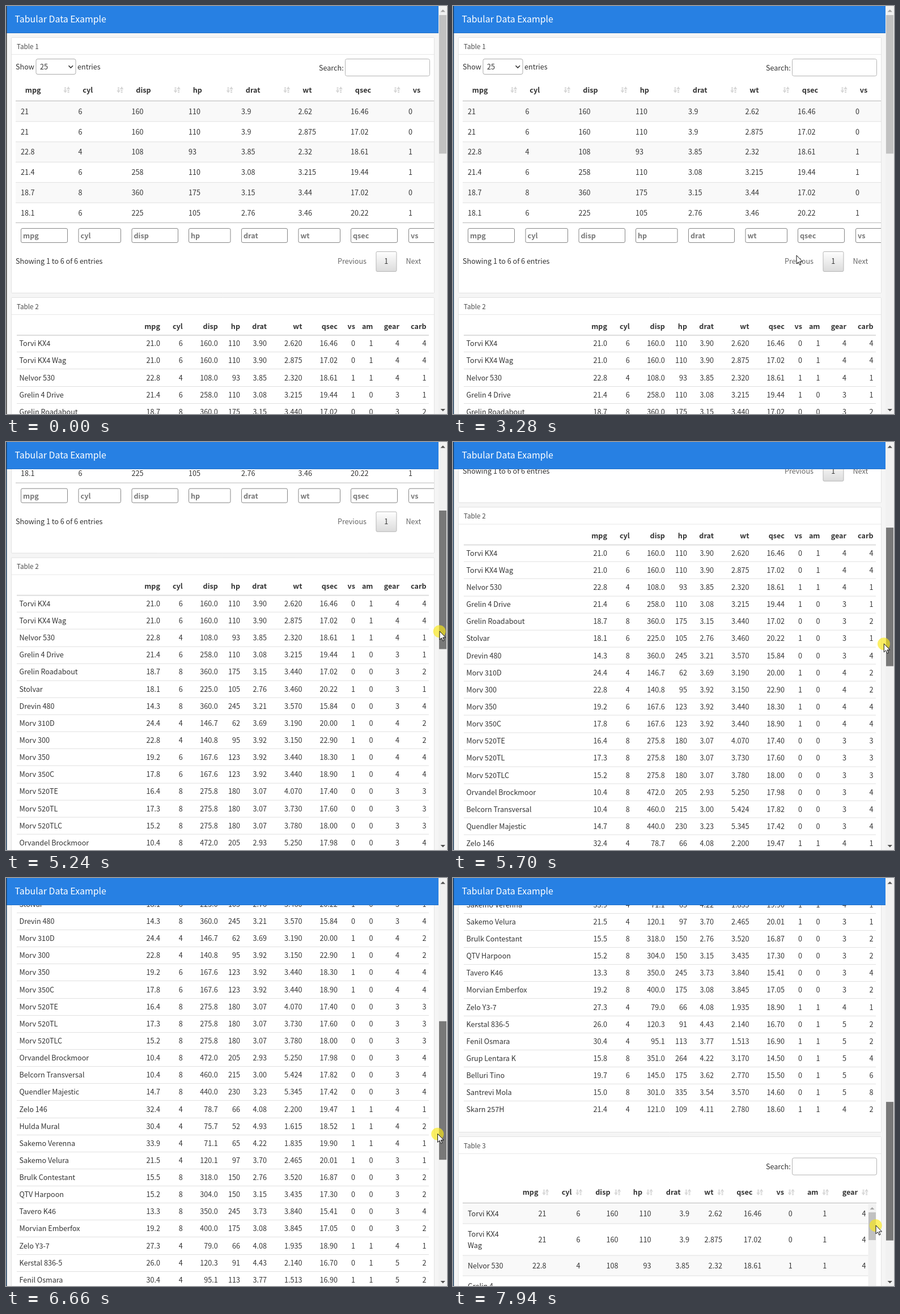
Animation, 778 px wide and 720 px high, one loop 8 s. Source, as an HTML page with a canvas:

```html
<!DOCTYPE html>
<html lang="en">
<head>
<meta charset="utf-8">
<title>Tabular Data Example</title>
<style>
html, body { margin: 0; width: 100%; height: 100%; overflow: hidden; background: #f5f5f5; }
canvas { display: block; }
</style>
</head>
<body>
<canvas id="stage" width="778" height="720"></canvas>
<script>
const ctx = document.getElementById('stage').getContext('2d');
const W = 778, H = 720, LOOP = 8000, BAR = 48;
const FACE = '"Noto Sans CJK JP", "Noto Sans CJK SC", "Noto Sans", sans-serif';
const SIZE = 12.6, INK = '#333';
const COLS = ['mpg', 'cyl', 'disp', 'hp', 'drat', 'wt', 'qsec', 'vs', 'am', 'gear', 'carb'];

// name | measurements | one digit each for vs, am, gear, carb
const CARS = `Torvi KX4|21.0 6 160.0 110 3.90 2.620 16.46|0144
Torvi KX4 Wag|21.0 6 160.0 110 3.90 2.875 17.02|0144
Nelvor 530|22.8 4 108.0 93 3.85 2.320 18.61|1141
Grelin 4 Drive|21.4 6 258.0 110 3.08 3.215 19.44|1031
Grelin Roadabout|18.7 8 360.0 175 3.15 3.440 17.02|0032
Stolvar|18.1 6 225.0 105 2.76 3.460 20.22|1031
Drevin 480|14.3 8 360.0 245 3.21 3.570 15.84|0034
Morv 310D|24.4 4 146.7 62 3.69 3.190 20.00|1042
Morv 300|22.8 4 140.8 95 3.92 3.150 22.90|1042
Morv 350|19.2 6 167.6 123 3.92 3.440 18.30|1044
Morv 350C|17.8 6 167.6 123 3.92 3.440 18.90|1044
Morv 520TE|16.4 8 275.8 180 3.07 4.070 17.40|0033
Morv 520TL|17.3 8 275.8 180 3.07 3.730 17.60|0033
Morv 520TLC|15.2 8 275.8 180 3.07 3.780 18.00|0033
Orvandel Brockmoor|10.4 8 472.0 205 2.93 5.250 17.98|0034
Belcorn Transversal|10.4 8 460.0 215 3.00 5.424 17.82|0034
Quendler Majestic|14.7 8 440.0 230 3.23 5.345 17.42|0034
Zelo 146|32.4 4 78.7 66 4.08 2.200 19.47|1141
Hulda Mural|30.4 4 75.7 52 4.93 1.615 18.52|1142
Sakemo Verenna|33.9 4 71.1 65 4.22 1.835 19.90|1141
Sakemo Velura|21.5 4 120.1 97 3.70 2.465 20.01|1031
Brulk Contestant|15.5 8 318.0 150 2.76 3.520 16.87|0032
QTV Harpoon|15.2 8 304.0 150 3.15 3.435 17.30|0032
Tavero K46|13.3 8 350.0 245 3.73 3.840 15.41|0034
Morvian Emberfox|19.2 8 400.0 175 3.08 3.845 17.05|0032
Zelo Y3-7|27.3 4 79.0 66 4.08 1.935 18.90|1141
Kerstal 836-5|26.0 4 120.3 91 4.43 2.140 16.70|0152
Fenil Osmara|30.4 4 95.1 113 3.77 1.513 16.90|1152
Grup Lentara K|15.8 8 351.0 264 4.22 3.170 14.50|0154
Belluri Tino|19.7 6 145.0 175 3.62 2.770 15.50|0156
Santrevi Mola|15.0 8 301.0 335 3.54 3.570 14.60|0158
Skarn 257H|21.4 4 121.0 109 4.11 2.780 18.60|1142`.split('\n').map(line => {
  const [name, nums, flags] = line.split('|');
  return { name, cells: [...nums.split(' '), ...flags] };
});

// The screen refreshes in bursts: [first change, last change, count]
const BURSTS = [[70, 1040, 7], [1520, 2320, 6], [2630, 3610, 7], [3770, 4250, 4],
  [4590, 5560, 7], [5700, 6660, 7], [6830, 7150, 3], [7460, 7940, 4]];
const SCROLL = [[4250, 0], [4590, 14.5], [5237, 310.5], [5560, 385], [6020, 432.5],
  [6660, 700], [7150, 853], [7940, 1121]];
const POINTER = [[70, 2, 640], [1040, 678, 240], [1520, 700, 225], [1840, 768, 177], [2320, 700, 300],
  [2630, 722, 104], [3120, 606, 440], [3610, 720, 452], [3770, 735, 420], [4250, 769, 233],
  [4590, 770, 235], [5237, 765, 334], [6020, 757, 371], [7150, 765, 513], [7940, 746, 613]];

function heldTime(t) {
  let held = 0;
  for (const [from, to, n] of BURSTS) {
    if (t < from) break;
    const step = (to - from) / (n - 1);
    held = Math.min(to, from + Math.floor((t - from) / step + 0.001) * step);
  }
  return held;
}

function sample(keys, t, i) {
  if (t <= keys[0][0]) return keys[0][i];
  for (let k = 1; k < keys.length; k++) {
    const a = keys[k - 1], b = keys[k];
    if (t <= b[0]) return a[i] + (b[i] - a[i]) * (t - a[0]) / (b[0] - a[0]);
  }
  return keys[keys.length - 1][i];
}

function rect(x, y, w, h, fill) {
  ctx.fillStyle = fill;
  ctx.fillRect(x, y, w, h);
}

function box(x, y, w, h, r, stroke, fill) {
  ctx.beginPath();
  ctx.roundRect(x + 0.5, y + 0.5, w - 1, h - 1, r);
  ctx.fillStyle = fill;
  ctx.fill();
  ctx.strokeStyle = stroke;
  ctx.lineWidth = 1;
  ctx.stroke();
}

function poly(points, fill) {
  ctx.beginPath();
  points.forEach(([x, y]) => ctx.lineTo(x, y));
  ctx.closePath();
  ctx.fillStyle = fill;
  ctx.fill();
}

// y is the middle of the capitals
function text(s, x, y, { bold, right, size = SIZE, color = INK } = {}) {
  ctx.font = `${bold ? 700 : 400} ${size}px ${FACE}`;
  ctx.textAlign = right ? 'right' : 'left';
  ctx.fillStyle = color;
  ctx.fillText(s, x, y + size * 0.365);
}

function clipped(x, y, w, h, draw) {
  ctx.save();
  ctx.beginPath();
  ctx.rect(x, y, w, h);
  ctx.clip();
  draw();
  ctx.restore();
}

function panel(title, top, height) {
  box(9, top, 747, height, 1, '#e2e2e2', '#fff');
  rect(10, top + 30, 745, 1, '#e8e8e8');
  text(title, 19, top + 16.5, { size: 11.65, color: '#4c4c4c' });
}

function sortIcon(x, y) {
  const c = '#d6d6d6';
  poly([[x - 6, y + 1], [x + 0.5, y + 1], [x - 2.8, y + 5.5]], c);
  poly([[x - 0.5, y - 1], [x + 6, y - 1], [x + 2.8, y - 6]], c);
  rect(x - 4.3, y - 4.5, 3, 2, c);
  rect(x - 4.3, y - 1.5, 3, 2, c);
  rect(x + 1.3, y, 3, 2, c);
  rect(x + 1.3, y + 3, 3, 2, c);
}

function searchField(y) {
  text('Search:', 552, y);
  box(598, y - 16, 150, 31, 3, '#b4b4b4', '#fff');
}

function tableOne() {
  const left = [26, 127.5, 221.5, 322, 415, 515.5, 608, 710];
  const width = [83, 75.5, 82.5, 74.5, 82, 74.5, 83, 80];
  panel('Table 1', 55, 452);
  text('Show', 17, 107.5);
  box(52.5, 93, 71, 28, 3, '#ababab', '#fff');
  text('25', 60, 107.5);
  ctx.beginPath();
  ctx.moveTo(110.5, 105.2);
  ctx.lineTo(114.3, 109);
  ctx.lineTo(118.1, 105.2);
  ctx.strokeStyle = INK;
  ctx.lineWidth = 1.6;
  ctx.stroke();
  text('entries', 126, 107.5);
  searchField(109);

  clipped(10, 120, 745, 310, () => {
    left.forEach((x, c) => {
      text(COLS[c], x + 7.8, 148, { bold: true });
      if (c < 7) sortIcon(left[c + 1] - 20.2, 148);
    });
    CARS.slice(0, 6).forEach((car, r) => {
      const top = 168 + r * 35.85;
      if (r % 2 === 0) rect(17, top, 740, 35.85, '#f9f9f9');
      if (r) rect(17, top - 0.5, 740, 1, '#e0e0e0');
      left.forEach((x, c) => text(String(+car.cells[c]), x, top + 18.2));
    });
    rect(17, 167, 740, 1, '#b8b8b8');
    rect(17, 382, 740, 1, '#b8b8b8');
    left.forEach((x, c) => {
      box(x, 392, width[c], 26, 2.5, '#858585', '#fff');
      text(COLS[c], x + 4, 405.3, { bold: true, color: '#777' });
    });
  });

  text('Showing 1 to 6 of 6 entries', 17, 450.5);
  text('Previous', 585, 450.8, { color: '#666' });
  const shade = ctx.createLinearGradient(0, 433, 0, 468);
  shade.addColorStop(0, '#fff');
  shade.addColorStop(1, '#dcdcdc');
  box(652.5, 433, 37, 36, 2, '#b5b5b5', shade);
  text('1', 667.3, 450.8);
  text('Next', 705.5, 450.8, { color: '#666' });
}

function tableTwo() {
  const right = [272, 311.8, 373.8, 413, 460, 522.5, 585, 616, 647.5, 694, 741.5];
  panel('Table 2', 514, 1056);
  right.forEach((x, c) => text(COLS[c], x, 565, { bold: true, right: true }));
  rect(19, 580, 727, 2, '#ddd');
  CARS.forEach((car, r) => {
    const y = 595.7 + r * 30.13;
    text(car.name, 23.5, y);
    right.forEach((x, c) => text(car.cells[c], x, y, { right: true }));
    if (r < CARS.length - 1) rect(19, Math.round(y + 14.6), 727, 1, '#e0e0e0');
  });
}

function tableThree() {
  const right = [164.5, 224.5, 291.5, 349.5, 417, 475, 544.3, 598.7, 659.3, 728.5];
  const head = [150.5, 209.5, 277.5, 334, 401.5, 459.5, 528.5, 584, 644.5, 714];
  panel('Table 3', 1577, 500);
  searchField(1630.5);
  right.forEach((x, c) => {
    text(COLS[c], head[c], 1675.5, { bold: true, right: true });
    sortIcon(head[c] + 12.8, 1675.5);
  });
  let top = 1695;
  CARS.slice(0, 4).forEach((car, r) => {
    const words = car.name.split(' ');
    const lines = words.length > 2 ? [words.slice(0, 2).join(' '), words[2]] : [car.name];
    const h = lines.length > 1 ? 56 : 36;
    if (r % 2 === 0) rect(17, top, 716, h, '#f9f9f9');
    if (r) rect(17, top - 0.5, 716, 1, '#e0e0e0');
    lines.forEach((s, i) => text(s, 26, top + 18.2 + i * 20));
    right.forEach((x, c) => text(String(+car.cells[c]), x, top + h / 2, { right: true }));
    top += h;
  });
  rect(17, 1694, 730, 1, '#b8b8b8');
  rect(732.5, 1696, 14, 300, '#f1f1f1');
  poly([[735.5, 1706], [743.5, 1706], [739.5, 1702]], '#a3a3a3');
  rect(733, 1711, 13, 49, '#c1c1c1');
}

function scrollbar(scroll, t) {
  const hover = t > 4000;
  rect(763, 0, 15, H, '#f1f1f1');
  poly([[766.5, 10.5], [775, 10.5], [770.8, 6.2]], scroll ? '#505050' : '#a3a3a3');
  poly([[766.5, 711], [775, 711], [770.8, 715.2]], '#505050');
  rect(764, 16 + scroll / 2.957, 13, 244.5, scroll ? '#787878' : hover ? '#a8a8a8' : '#c1c1c1');
}

function pointer(x, y, pressed) {
  if (pressed) {
    ctx.beginPath();
    ctx.arc(x - 0.3, y + 0.3, 11, 0, 7);
    ctx.fillStyle = 'rgba(250,232,20,.65)';
    ctx.fill();
  }
  const shape = [[0, 0], [0, 15], [3.4, 11.8], [5.8, 17.2], [8, 16.2], [5.7, 11], [10.5, 11]];
  poly(shape.map(([a, b]) => [x + a, y + b]), '#fff');
  ctx.strokeStyle = '#111';
  ctx.lineWidth = 1;
  ctx.stroke();
}

function draw(now) {
  const t = heldTime(now % LOOP);
  const scroll = sample(SCROLL, t, 1);
  rect(0, 0, W, H, '#f5f5f5');
  clipped(0, BAR, 763, H - BAR, () => {
    ctx.translate(0, -scroll);
    if (scroll < 470) tableOne();
    tableTwo();
    if (scroll > 850) tableThree();
  });
  rect(0, 0, 763, BAR, '#2780e3');
  rect(0, BAR - 1, 763, 1, '#1f6fc8');
  text('Tabular Data Example', 15.5, 23.5, { size: 15.95, color: '#fff' });
  rect(0, 0, 1.5, H, t < 70 ? '#3c3c3c' : '#1d3c5c');
  scrollbar(scroll, t);
  if (t >= 70) pointer(sample(POINTER, t, 1), sample(POINTER, t, 2), scroll > 0);
}

function tick() {
  draw(performance.now());
  requestAnimationFrame(tick);
}
tick();
</script>
</body>
</html>
```
